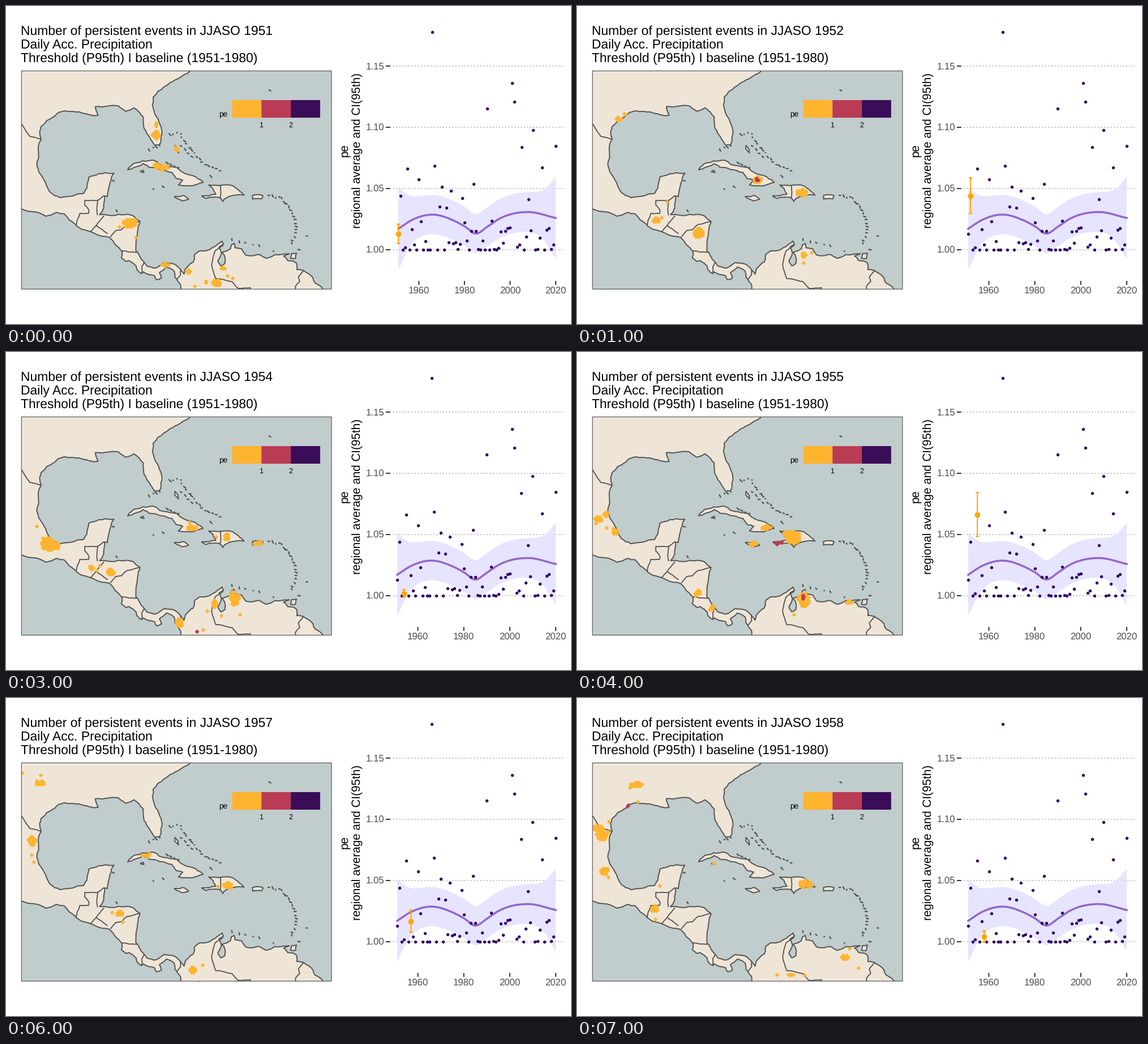
These frames come from a looping animation (998x561 px, 8000 ms). A matplotlib script:

```python
import numpy as np
import matplotlib.pyplot as plt
from matplotlib.animation import FuncAnimation
from matplotlib.patches import Polygon, Rectangle
from matplotlib.path import Path

W, H, DPI = 998, 561, 64
PT = 72 / DPI  # points per pixel
INK, SEA, LAND = "#505152", "#c1cccc", "#efe5d6"
AMBER, RED, PLUM = "#ffb42f", "#ba3b54", "#390d57"
FIRST, LAST = 1951, 2020

# Key points of the coasts in degrees east and north
NORTH_COAST = [
    (-75.5, 35.6), (-76.6, 34.6), (-77.9, 33.9), (-79.2, 33.2), (-80.6, 32.3),
    (-81.3, 31.5), (-81.4, 30.5), (-80.9, 29), (-80.5, 28.3), (-80.03, 26.9),
    (-80.2, 25.6), (-80.5, 25.15), (-81.1, 25.15), (-81.8, 26.2),
    (-82.6, 27.4), (-82.7, 28.9), (-83.5, 29.7), (-84, 30.1), (-85.2, 29.65),
    (-86.2, 30.35), (-88, 30.3), (-89.5, 30.25), (-89.4, 29.8), (-89.1, 29.1),
    (-90.2, 29.15), (-91.3, 29.4), (-92.3, 29.55), (-93.8, 29.7),
    (-94.7, 29.5), (-95.3, 28.95), (-96.4, 28.4), (-97.2, 27.6),
    (-97.4, 26.9), (-97.2, 25.9), (-97.6, 24.8), (-97.8, 22.5), (-97.3, 21.3),
    (-96.4, 19.7), (-95.8, 18.8), (-94.5, 18.15), (-92, 18.65), (-91.2, 18.7),
    (-90.7, 19.4), (-90.4, 20.9), (-89, 21.35), (-86.85, 21.4)]
SOUTH_COAST = [
    (-87.4, 20.2), (-87.8, 18.3), (-88.2, 18.4), (-88.3, 16.8), (-88.9, 15.9),
    (-87.5, 15.8), (-85, 15.95), (-84.2, 15.8), (-83.15, 15), (-83.5, 13.7),
    (-83.75, 11.1), (-83, 10), (-82.2, 9.1), (-81.2, 8.8), (-79.7, 9.55),
    (-78.5, 9.4), (-77.4, 8.6), (-76.9, 8), (-76.7, 8.7), (-75.6, 9.6),
    (-75.4, 10.6), (-74.8, 11.05), (-73.3, 11.25), (-72.2, 11.95),
    (-71.5, 12.4), (-71.3, 12), (-71.95, 11.6), (-71.6, 10.9), (-72.1, 9.8),
    (-71.7, 9.1), (-71.1, 9.4), (-71.1, 10.2), (-71.5, 10.9), (-70.3, 11.4),
    (-70.2, 11.9), (-69.8, 12.1), (-69.7, 11.5), (-68.7, 11.35),
    (-68.2, 10.55), (-66.2, 10.6), (-65.3, 10.1), (-64, 10.6), (-62, 10.7),
    (-62.8, 10.4), (-62.2, 9.8), (-61, 9.5), (-60.9, 8.6), (-60, 8.5),
    (-58.6, 7.5), (-58.3, 6.8), (-57.2, 6), (-55.8, 5.4)]
WEST_COAST = [
    (-77.4, 5.4), (-77.4, 6.6), (-78.2, 7.6), (-78.3, 8.4), (-79.4, 8.95),
    (-80.4, 8.2), (-80.1, 7.5), (-80.8, 7.25), (-81.1, 7.8), (-82.7, 8.3),
    (-82.9, 8.1), (-83.6, 8.6), (-83.7, 9.1), (-84.7, 9.8), (-85.2, 9.7),
    (-85.8, 10.2), (-85.7, 11), (-87.5, 12.9), (-89.8, 13.5), (-91.4, 13.95),
    (-92.3, 14.6), (-93.9, 16), (-95, 16.2), (-96.5, 15.7), (-98.4, 16.3),
    (-101, 17.2), (-101, 36)]
ISLANDS = [
    [(-84.9, 21.85), (-84.2, 22.6), (-82.8, 23.05), (-81.3, 23.15),
     (-79.3, 22.4), (-78, 22.2), (-77.2, 21.6), (-75.7, 21.1), (-74.2, 20.2),
     (-75.2, 19.9), (-77.7, 19.85), (-77.1, 20.5), (-78, 20.7), (-78.6, 21.5),
     (-80.4, 21.9), (-81.9, 22.2), (-82.7, 22.7), (-83.9, 22.2)],
    [(-73.4, 19.85), (-71.7, 19.8), (-69.9, 19.7), (-69.2, 19.2),
     (-68.4, 18.5), (-70.6, 18.3), (-71.4, 17.65), (-71.9, 18.2),
     (-73.8, 18.05), (-74.4, 18.4), (-72.4, 18.6), (-72.8, 19.4)],
    [(-78.3, 18.3), (-77.2, 18.45), (-76.25, 17.95), (-77.2, 17.75)],
    [(-67.2, 18.45), (-65.7, 18.4), (-65.9, 18), (-67.2, 17.97)],
    [(-61.7, 10.7), (-60.95, 10.8), (-61.1, 10.1), (-61.8, 10.1)],
    [(-78.2, 25.1), (-77.75, 24.6), (-77.7, 24.1), (-78.2, 24.6)],
    [(-83.1, 21.6), (-82.7, 21.8), (-82.6, 21.5)]]
BORDERS = [
    [(-100, 28), (-99.4, 27.1), (-98.8, 26.3), (-97.2, 25.9)],
    [(-92.2, 14.5), (-92.1, 15.1), (-91.7, 16.07), (-90.45, 16.07),
     (-90.4, 16.5), (-91, 17.2), (-91, 17.8), (-89.15, 17.8), (-88.3, 18.4)],
    [(-89.15, 17.8), (-89.2, 15.9)],
    [(-88.3, 15.7), (-89.35, 14.5), (-90.1, 13.7)],
    [(-89.35, 14.45), (-88.5, 13.9), (-87.8, 13.4)],
    [(-87.3, 13), (-86.6, 13.8), (-85.8, 13.9), (-85, 14.6), (-83.2, 15)],
    [(-85.7, 11.1), (-84.8, 10.95), (-83.7, 10.9)],
    [(-82.6, 9.5), (-82.9, 9), (-82.9, 8.1)],
    [(-77.4, 8.6), (-77.4, 7.9), (-77.9, 7.3)],
    [(-71.4, 11.8), (-72.5, 11.1), (-73, 9.3), (-72.4, 7.4), (-70.1, 7),
     (-69.2, 6.1), (-67.5, 6.2), (-67.4, 5.6)],
    [(-60, 8.4), (-60.7, 7.6), (-60.5, 7), (-61.1, 6.4), (-61, 5.6)],
    [(-71.75, 19.75), (-71.7, 18.7), (-71.75, 18.2)]]
# Chains of islets: how many, and the line they follow
CHAINS = [
    (18, [(-79, 26.6), (-77.6, 26.8), (-76.9, 25.7), (-76.2, 24.9),
          (-75.2, 23.7), (-74, 22.6), (-71.8, 21.7)]),
    (4, [(-77.3, 25), (-75.8, 23.5)]),
    (4, [(-79.2, 22.7), (-77.7, 22.1)]),
    (4, [(-81.8, 24.6), (-80.4, 25.1)]),
    (19, [(-64.9, 18.4), (-63.1, 18.1), (-62.2, 17.2), (-61.5, 16.2),
          (-60.95, 14.4), (-61.2, 13.2), (-61.7, 12.1)]),
    (5, [(-70, 12.5), (-68.3, 12.1), (-66.2, 11.85)]),
    (2, [(-81.3, 19.3), (-79.8, 19.7)]),
    (2, [(-64.2, 11), (-60.7, 11.25)]),
    (1, [(-64.75, 32.3)]), (1, [(-59.55, 13.15)]), (1, [(-86.9, 20.4)]),
    (1, [(-86.4, 16.35)]), (1, [(-73.2, 21)])]

# Main event patches per year in stage pixels: x, y, rx, ry
HOT = {
    1951: [(264, 227, 6, 6), (265, 209, 3, 3), (302, 252, 6, 6),
           (275, 282, 13, 6), (219, 382, 12, 8), (281, 456, 6, 3),
           (323, 468, 4, 3), (372, 488, 7, 5), (383, 462, 3, 2)],
    1952: [(75, 200, 6, 4), (318, 306, 8, 5), (398, 329, 9, 6),
           (140, 378, 5, 4), (215, 400, 8, 8), (400, 440, 5, 4)],
    1953: [(44, 202, 18, 12), (40, 220, 18, 16), (250, 207, 9, 10),
           (266, 240, 8, 6), (252, 276, 9, 5), (282, 291, 16, 3),
           (176, 297, 14, 3), (165, 353, 3, 6), (493, 487, 5, 3)],
    1954: [(78, 338, 16, 13), (328, 310, 10, 4), (390, 327, 4, 6),
           (446, 338, 11, 3), (151, 381, 6, 3), (185, 388, 6, 5),
           (306, 478, 5, 7), (368, 443, 3, 8), (404, 433, 8, 13)],
    1955: [(51, 287, 4, 4), (37, 295, 6, 4), (66, 316, 5, 5), (333, 309, 9, 3),
           (312, 338, 10, 3), (378, 326, 16, 12), (213, 424, 5, 4),
           (238, 452, 4, 4), (400, 436, 9, 12), (482, 441, 6, 2)],
    1956: [(151, 170, 5, 3), (45, 305, 11, 8), (55, 314, 13, 6),
           (174, 336, 5, 5), (155, 384, 6, 3), (186, 387, 11, 4),
           (203, 411, 5, 5), (223, 421, 4, 3), (274, 461, 4, 4)],
    1957: [(60, 150, 9, 4), (250, 277, 6, 3), (392, 330, 7, 5),
           (45, 252, 6, 8), (200, 380, 7, 4), (330, 480, 5, 5)],
    1958: [(105, 153, 11, 4), (36, 228, 9, 5), (43, 241, 9, 10),
           (48, 305, 6, 7), (241, 291, 5, 3), (405, 327, 14, 6),
           (137, 372, 5, 6), (474, 457, 7, 3), (376, 489, 9, 1)]}
STRONG = {1952: [(318, 306, 4, 2)], 1954: [(337, 493, 0, 0)],
          1955: [(355, 336, 8, 3), (400, 432, 1, 6)], 1958: [(89, 191, 2, 2)]}

# Outstanding yearly means above 1, in units of 0.0001
KEY_MEANS = {
    1951: 130, 1952: 442, 1953: 0, 1954: 20, 1955: 664, 1956: 0, 1957: 168,
    1958: 42, 1960: 575, 1966: 1780, 1967: 683, 1969: 350, 1970: 515,
    1972: 344, 1974: 482, 1979: 422, 1984: 538, 1990: 1154, 2001: 1360,
    2002: 1209, 2005: 838, 2008: 413, 2010: 977, 2014: 670, 2020: 847}
# Trend line: year, stage y
TREND = [(1951, 393), (1957, 377.5), (1966, 368), (1975, 378), (1980, 388.5),
         (1985, 401.5), (1990, 389.5), (1995, 376), (2008, 363.5), (2020, 374)]


def geo(points):
    """Degrees to stage pixels."""
    lon, lat = np.array(points, float).T
    return np.c_[27 + (lon + 100) * 12.45, 114.5 + (35 - lat) * 13.28]


def rough(p, rng, closed=True, levels=2, size=0.09):
    """Fractal coast: displace edge midpoints in proportion to edge length."""
    for _ in range(levels):
        ahead = np.roll(p, -1, 0)
        length = np.hypot(*(ahead - p).T)[:, None].clip(0, 30)
        mid = (p + ahead) / 2 + rng.uniform(-size, size, p.shape) * length
        p = np.stack([p, mid], 1).reshape(-1, 2)
        if not closed:
            p = p[:-1]
    return p


def along(p, n):
    """n points evenly spread along a line."""
    dist = np.r_[0, np.hypot(*np.diff(p, axis=0).T).cumsum()]
    s = np.linspace(0, dist[-1], n)
    return np.c_[np.interp(s, dist, p[:, 0]), np.interp(s, dist, p[:, 1])]


def smooth(points, x):
    """Cubic Hermite curve through key points."""
    xs, ys = np.array(points, float).T
    i = np.clip(np.searchsorted(xs, x, "right") - 1, 0, len(xs) - 2)
    h = xs[i + 1] - xs[i]
    u, m = (x - xs[i]) / h, np.gradient(ys, xs)
    return ((2 * u**3 - 3 * u**2 + 1) * ys[i] + (3 * u**2 - 2 * u**3) * ys[i + 1]
            + h * ((u**3 - 2 * u**2 + u) * m[i] + (u**3 - u**2) * m[i + 1]))


def on_land(p):
    return np.any([s.contains_points(p) for s in land], axis=0)


def marks(spots, seed, strays=0):
    """Ragged patches on a fine grid, with a few stray marks around them."""
    rng = np.random.default_rng(seed)
    out = [np.empty((0, 2))]
    for x, y, rx, ry in spots:
        gx, gy = np.meshgrid(np.arange(-rx, rx + 1, 3),
                             np.arange(-ry, ry + 1, 3))
        reach = (gx / (rx + .5))**2 + (gy / (ry + .5))**2
        keep = reach < rng.uniform(0.65, 1.25, gx.shape)
        patch = np.c_[x + gx[keep], y + gy[keep]]
        out += [[(x, y)], patch[on_land(patch)]]
        loose = (x, y) + rng.normal(0, 16, (strays, 2))
        out.append(loose[on_land(loose)])
    return np.concatenate(out)


def year_x(year, first):
    return 971 - (LAST - year) * 280 / (LAST - first)


def value_y(v):
    return 430 - (v - 1) * 2160


plt.rcParams["font.family"] = "Liberation Sans"
plt.rcParams["text.hinting"] = "none"
fig = plt.figure(figsize=(W / DPI, H / DPI), dpi=DPI, facecolor="white")
ax = fig.add_axes([0, 0, 1, 1])
ax.set_xlim(0, W)
ax.set_ylim(H, 0)
ax.axis("off")


def label(x, y, text, size, color="black", **kw):
    return ax.text(x, y, text, size=size * PT, color=color, va="baseline", **kw)


def stroke(xs, ys, width, color, **kw):
    return ax.plot(xs, ys, lw=width * PT, color=color, snap=False, **kw)[0]


def box(x, y, w, h, **kw):
    return ax.add_patch(Rectangle((x, y), w, h, snap=False, **kw))


# Map
panel = box(27.3, 114.5, 547.7, 385, fc=SEA, ec="none")
rng = np.random.default_rng(4)
coasts = [NORTH_COAST + SOUTH_COAST + WEST_COAST] + ISLANDS
outlines = [rough(geo(c), rng) for c in coasts]
land = [Path(o) for o in outlines]
for outline in outlines:
    ax.add_patch(Polygon(outline, fc=LAND, ec=INK, lw=1.9 * PT,
                         joinstyle="round", zorder=2)).set_clip_path(panel)
for line in BORDERS:
    stroke(*rough(geo(line), rng, closed=False, size=0.05).T, 1.8, INK,
           zorder=2.1).set_clip_path(panel)
for n, line in CHAINS:
    for x, y in along(geo(line), n) + rng.uniform(-1.5, 1.5, (n, 2)):
        dx, dy = rng.uniform(0, 2, 2)
        stroke([x - dx, x + dx], [y - dy, y + dy], 2.3, INK, zorder=2.1,
               solid_capstyle="round")
diamond = dict(marker="D", s=(5.4 * PT)**2, lw=0, snap=False)
amber = ax.scatter([], [], color=AMBER, zorder=3, **diamond)
red = ax.scatter([], [], color=RED, zorder=3.1, **diamond)
for dots in (amber, red):
    dots.set_clip_path(panel)
box(27.3, 114.5, 547.7, 385, fc="none", ec="#4d4d4d", lw=1.1 * PT, zorder=4)

# Legend and title
for k, color in enumerate((AMBER, RED, PLUM)):
    box(399.5 + 51.8 * k, 166, 51.8, 31, fc=color, ec="none", zorder=4)
label(376.5, 195, "pe", 13.7)
label(451, 213.5, "1", 12.5, ha="center")
label(503, 213.5, "2", 12.5, ha="center")
title = label(26.2, 51, "", 22.92)
label(26.2, 75.3, "Daily Acc. Precipitation", 22.92)
label(26.2, 99.7, "Threshold (P95th) I baseline (1951-1980)", 22.92)

# Chart
for v in (1.0, 1.05, 1.1, 1.15):
    y = value_y(v)
    stroke([678, 987], [y, y], 1.9, "#b8b8b8", ls=(0, (1, 1.9)), zorder=1)
    stroke([672, 677.5], [y, y], 2, "#333333")
    label(668.5, y + 6, f"{v:.2f}", 16.7, "#4d4d4d", ha="right")
upright = dict(rotation=90, rotation_mode="anchor", ha="center")
label(603, 255, "pe", 20.6, **upright)
label(625.5, 255, "regional average and CI(95th)", 20.6, **upright)
x_ticks = [(yr, stroke([0, 0], [486, 491], 2, "#333333"),
            label(0, 508, str(yr), 16.7, "#4d4d4d", ha="center"))
           for yr in (1960, 1980, 2000, 2020)]

# Quiet years lie at or just above 1
years = np.arange(FIRST, LAST + 1)
quiet = 240 * rng.uniform(-0.6, 1, len(years)).clip(0)**2
means = np.array([KEY_MEANS.get(yr, q) for yr, q in zip(years, quiet)]) / 1e4
mean_y = value_y(1 + means)

# The band flares towards both ends
curve_years = np.linspace(FIRST, LAST, 185)
trend_y = smooth(TREND, curve_years)
edge = np.minimum(curve_years - FIRST, LAST - curve_years) / 3
half = 34.5 + 37 * np.exp(-0.6 * edge**1.4)
band = ax.add_patch(Polygon([(0, 0)] * 3, fc="#e2e0ff", alpha=0.85, lw=0,
                            zorder=1.5))
trend = stroke([], [], 3.5, "#9466ca", zorder=3)
dot = dict(marker="o", ls="", mew=0, snap=False)
past = ax.plot([], [], ms=5.4 * PT, color="#30006a", zorder=4, **dot)[0]
bar = stroke([], [], 2, "#ffa500", zorder=5)
now = ax.plot([], [], ms=9.8 * PT, color="#ffa500", zorder=6, **dot)[0]


def update(i):
    year = FIRST + i
    title.set_text(f"Number of persistent events in JJASO {year}")
    amber.set_offsets(marks(HOT[year], year, strays=2))
    red.set_offsets(marks(STRONG.get(year, []), year))

    # The bar's caps widen the axis in the first year
    first = FIRST - 0.5 if i == 0 else FIRST
    for yr, tick, text in x_ticks:
        x = year_x(yr, first)
        tick.set_xdata([x, x])
        text.set_x(x)
    cx = year_x(curve_years, first)
    band.set_xy(np.r_[np.c_[cx, trend_y - half],
                      np.c_[cx, trend_y + half][::-1]])
    trend.set_data(cx, trend_y)
    others = years != year
    past.set_data(year_x(years[others], first), mean_y[others])

    x, y, s = year_x(year, first), mean_y[i], 150 * np.sqrt(means[i])
    bar.set_data([x - 2, x + 2, x, x, x - 2, x + 2],
                 [y - s, y - s, y - s, y + s, y + s, y + s])
    now.set_data([x], [y])
    return []


anim = FuncAnimation(fig, update, frames=8, interval=1000, repeat=True,
                     repeat_delay=0, init_func=lambda: update(0))
plt.show()
```
